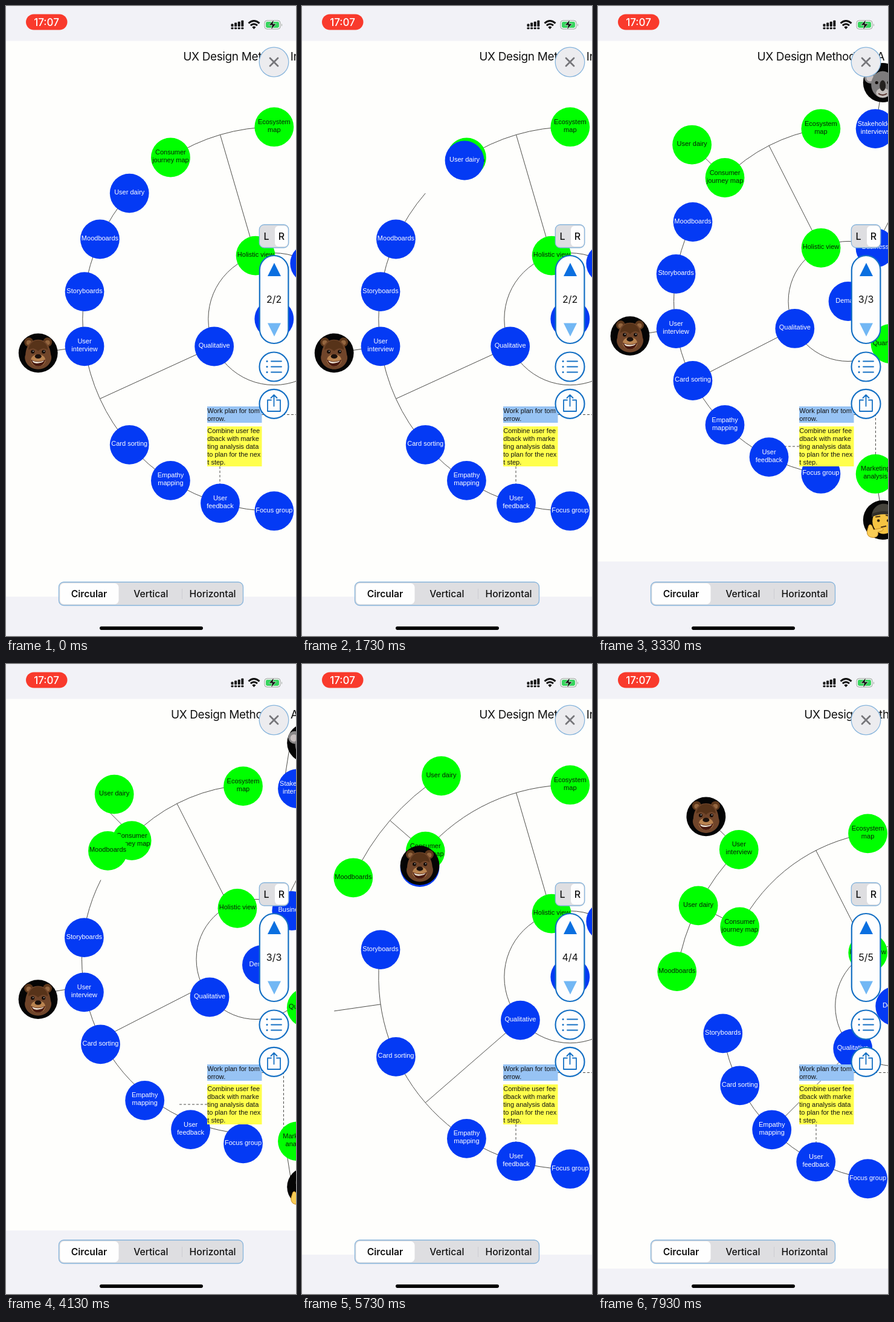
Recreate the animation shown at these times as an HTML page. Size 480 px wide and 1040 px high, loop 7.99 s.

```html
<!DOCTYPE html>
<html lang="en">
<head>
<meta charset="utf-8">
<title>Circular mind map</title>
<style>
  html, body { margin: 0; width: 100%; height: 100%; overflow: hidden; background: #fefefc; }
  svg { display: block; width: 100%; height: 100%; }
  text { font-family: Inter, Roboto, sans-serif; }
  .mid { text-anchor: middle; }
  .small text, .node text { font: 11px "Liberation Sans", Arial, sans-serif; }
  .node text { text-anchor: middle; }
  .line { fill: none; stroke: #4c4c48; stroke-width: 1; }
  .dash { stroke-dasharray: 4 3; }
  .ring { fill: #fefefe; stroke: #1570c4; stroke-width: 2.2; }
  .icon { fill: none; stroke: #1570c4; stroke-width: 1.8; stroke-linecap: round; stroke-linejoin: round; }
  .tray { fill: #dedee1; stroke: #86b4dc; stroke-width: 1.3; }
  .bar { fill: #f2f2f7; }
</style>
</head>
<body>
<svg viewBox="0 0 480 1040" preserveAspectRatio="none">
  <rect width="480" height="1040" fill="#fefefc"/>
  <text id="title" y="90" font-size="19" letter-spacing="-.37" fill="#111">UX Design Methods In A Nutshell</text>
  <path id="lines" class="line"/>
  <path id="dashes" class="line dash"/>
  <g id="nodes"></g>
  <g id="notes" class="small"></g>

  <rect class="bar" width="480" height="57.5"/>
  <rect id="footer" class="bar" width="480" height="140"/>

  <rect x="33" y="13.5" width="68.5" height="26" rx="13" fill="#f93a2c"/>
  <text class="mid" x="67" y="32.6" font-size="17" font-weight="500" fill="#fff">17:07</text>
  <g id="signal" fill="#111"></g>
  <g fill="none" stroke="#111" stroke-width="3">
    <path d="M401.5 28.5Q410.3 20.5 419.5 28.5"/>
    <path d="M404.8 32.2Q410.4 27.3 416 32.2"/>
  </g>
  <path d="M407.3 35Q410.4 32.2 413.5 35L410.4 38.3Z" fill="#111"/>
  <rect x="428" y="24" width="26" height="14" rx="4" fill="#f8f8fa" stroke="#94a094"/>
  <rect x="430" y="26" width="22" height="10" rx="2.4" fill="#36d45d"/>
  <path d="M456 29v4.5q2-2.2 0-4.5" fill="#94a094"/>
  <path d="M443.5 22.5l-8.5 9.2h5.4l-1.8 7.5 8.6-9.8h-5.4z" fill="#111" stroke="#fff" stroke-width=".6"/>

  <circle cx="443.5" cy="92.5" r="24.3" fill="#ececef" stroke="#86b4dc" stroke-width="1.3"/>
  <path d="M437 86l13 13m0-13l-13 13" stroke="#76767a" stroke-width="2.8" stroke-linecap="round"/>

  <rect class="tray" x="419.3" y="361" width="48.5" height="38" rx="8"/>
  <rect x="445" y="363" width="21.5" height="34" rx="6" fill="#fefefe"/>
  <g class="mid" font-size="16" font-weight="500" fill="#111">
    <text x="431" y="386">L</text><text x="456" y="386">R</text>
  </g>

  <rect class="ring" x="419.8" y="412" width="47.6" height="145" rx="23.8"/>
  <path d="M444 424l11 22h-22z" fill="#0b6fe0"/>
  <path d="M444 545.5l11-22h-22z" fill="#72b7f4"/>
  <text id="count" class="mid" x="443.6" y="490.4" font-size="16" fill="#111"></text>

  <circle class="ring" cx="443.5" cy="595.5" r="24"/>
  <path class="icon" d="M439 586.5h17m-17 9h17m-17 9h17"/>
  <path class="icon" stroke-width="3" style="stroke-width:3" d="M432 586.5h.1m-.1 9h.1m-.1 9h.1"/>
  <circle class="ring" cx="443.5" cy="656.8" r="24"/>
  <path class="icon" d="M439 650.5h-6v18.5h21v-18.5h-6m-4.5 10v-18.5m-5 5l5-5 5 5"/>

  <rect class="tray" x="87.5" y="951" width="305" height="38.5" rx="8"/>
  <rect x="89.5" y="953" width="97" height="34.5" rx="6.5" fill="#fefefe"/>
  <path d="M291.5 962v17" stroke="#cdcdd2"/>
  <g class="mid" font-size="15.7" font-weight="500" fill="#111">
    <text x="137.5" y="976" font-weight="600">Circular</text>
    <text x="239.8" y="976">Vertical</text>
    <text x="342" y="976">Horizontal</text>
  </g>
  <rect x="155" y="1024.3" width="171" height="5.6" rx="2.8" fill="#050505"/>
</svg>
<script>
const LOOP = 7990;
const $ = id => document.getElementById(id);

// Slots count clockwise from the left; rings grow outward.
const wide = { x: 443.8, y: 516.7, slots: 22, radii: [0, 109, 317, 394.6, 473] };
const tight = { slots: 20, radii: [0, 99, 288.5, 365.5, 442.5] };
const dashWide = 'M354 760V820M423 674.5H480';

// arcs: [ring, from slot, to slot]; links: [slot, inner ring, outer ring]
const layouts = [
  { ...wide, footer: 975, count: '2/2', dashes: dashWide,
    arcs: [[2, 3.5, 5.5], [2, -5.5, 2.5]],
    links: [[4.5, 1, 2], [-1.5, 1, 2], [-.5, 2, 3]] },
  { ...tight, x: 414, y: 487.5, footer: 917, count: '3/3',
    dashes: 'M333 727H284M423 674.5H459.5V772',
    arcs: [[2, 2.5, 4.5], [2, -4.5, 1.5]],
    links: [[3.5, 1, 2], [-1.5, 1, 2], [-.5, 2, 3], [2.5, 2, 3],
            [6.5, 1, 2], [5.5, 2, 3], [-5.5, 2, 3]] },
  { ...wide, footer: 975, count: '4/4', dashes: dashWide,
    arcs: [[2, 2.5, 5.5], [2, -5.5, .5], [3, 1.5, 3.5]],
    links: [[4.5, 1, 2], [-2.5, 1, 2], [-.5, 2, 3], [2.5, 2, 3]] },
  { ...tight, x: 491.7, y: 564.8, footer: 998, count: '5/5',
    dashes: 'M361 760V821M423 674.5H480',
    arcs: [[2, 1.5, 4.5], [2, -4.5, -.5], [3, .5, 2.5]],
    links: [[3.5, 1, 2], [-2.5, 1, 2], [1.5, 2, 3], [2.5, 3, 4]] }
];

const steps = [
  { who: ['User dairy'], to: { x: 269, y: 255 }, grab: 900, hold: 1650, drop: 2000, settle: 2400, redraw: 2650 },
  { who: ['Moodboards'], to: { x: 207, y: 288 }, grab: 3420, hold: 3900, drop: 4000, settle: 4350, redraw: 4500 },
  { who: ['User|interview', 'bear'], to: { x: 195, y: 335.5 }, grab: 4950, hold: 5650, drop: 6000, settle: 6400, redraw: 7000 }
];

const faces = {
  bear: `<g fill="#5d371b"><circle cx="-15.5" cy="-18" r="7.5"/><circle cx="15.5" cy="-18" r="7.5"/></g>
    <g fill="#94663f"><circle cx="-15.5" cy="-17" r="4"/><circle cx="15.5" cy="-17" r="4"/></g>
    <path d="M0-22C14-22 20-10 21 3C25 12 16 27 0 27S-25 12-21 3C-20-10-14-22 0-22Z" fill="#70452a"/>
    <path d="M0-21C10-21 16-12 16-5Q8-11 0-3Q-8-11-16-5C-16-12-10-21 0-21Z" fill="#573319"/>
    <ellipse cy="12" rx="12" ry="10" fill="#b98350"/>
    <circle cx="-9" cy="-2" r="3" fill="#160d08"/><circle cx="9" cy="-2" r="3" fill="#160d08"/>
    <circle cx="-8.2" cy="-2.8" r=".8" fill="#fff"/><circle cx="9.8" cy="-2.8" r=".8" fill="#fff"/>
    <ellipse cy="5.5" rx="5.5" ry="3.7" fill="#1c110c"/>
    <path d="M-12 11Q0 17 12 11Q9 22 0 22T-12 11Z" fill="#47180f"/>
    <path d="M-10 12.5Q0 17 10 12.5Q8 16 0 17T-10 12.5Z" fill="#f1e6d6"/>`,
  koala: `<g fill="#8a8889"><circle cx="-20" cy="-9" r="10.5"/><circle cx="20" cy="-9" r="10.5"/></g>
    <g fill="#c9c1c1"><circle cx="-21" cy="-8" r="6"/><circle cx="21" cy="-8" r="6"/></g>
    <ellipse cy="3" rx="19" ry="22" fill="#7d7b7c"/>
    <ellipse cy="17" rx="11" ry="8" fill="#c4bfbc"/>
    <ellipse cy="5" rx="5" ry="9" fill="#24211f"/>
    <circle cx="-10" cy="0" r="2.6" fill="#15110f"/><circle cx="10" cy="0" r="2.6" fill="#15110f"/>
    <path d="M-7 18Q0 23 7 18" fill="none" stroke="#54302b" stroke-width="2"/>`,
  thinker: `<ellipse cx="2" cy="2" rx="19" ry="21" fill="#f5c342"/>
    <path d="M-18-5C-18-34 22-34 22-5Q2-14-18-5Z" fill="#46443c"/>
    <path d="M-18-5Q2-15 22-5V-10Q2-19-18-10Z" fill="#302e29"/>
    <circle cx="-7" cy="1" r="2.3" fill="#30220f"/><circle cx="9" cy="1" r="2.3" fill="#30220f"/>
    <path d="M-12-5l8-1m9-2l8 2M-3 12l9-2" fill="none" stroke="#4b3214" stroke-width="2"/>
    <path d="M-23 9q2-3 5 0l3 7 14-3q4 2 0 5l-7 2q2 8-7 9-11 0-11-10z" fill="#f8cc55" stroke="#c98d25"/>`
};

// A single ring value holds for every layout; greenFrom is the layout that turns it green.
const node = (name, slots, rings = 2, greenFrom = 9) =>
  ({ name, slots, rings: [].concat(rings), greenFrom });
const nodes = [
  node('Demand', [0, 0, 0, 0], 0),
  node('Business', [7.5, 6.5, 7.5, 6.5], 1),
  node('Holistic view', [4.5, 3.5, 4.5, 3.5], 1, 0),
  node('Qualitative', [-1.5, -1.5, -2.5, -2.5], 1),
  node('Quantitative', [-8.5, -7.5, -8.5, -7.5], 1, 0),
  node('Ecosystem|map', [5.5, 4.5, 5.5, 4.5], 2, 0),
  node('Consumer|journey map', [3.5, 2.5, 2.5, 1.5], 2, 0),
  node('Stakeholder|interviews', [6.5, 5.5, 6.5, 5.5]),
  node('Marketing|analysis', [-6.5, -5.5, -6.5, -5.5], 2, 0),
  node('koala', [6.5, 5.5, 6.5, 5.5], 3),
  node('thinker', [-6.5, -5.5, -6.5, -5.5], 3),
  node('Storyboards', [.5, .5, .5, -.5]),
  node('Card sorting', [-2.5, -1.5, -1.5, -1.5]),
  node('Empathy|mapping', [-3.5, -2.5, -3.5, -2.5]),
  node('User|feedback', [-4.5, -3.5, -4.5, -3.5]),
  node('Focus group', [-5.5, -4.5, -5.5, -4.5]),
  node('User dairy', [2.5, 2.5, 3.5, 1.5], [2, 3, 3, 3], 1),
  node('Moodboards', [1.5, 1.5, 1.5, .5], [2, 2, 3, 3], 2),
  node('User|interview', [-.5, -.5, -.5, 2.5], [2, 2, 2, 3], 3),
  node('bear', [-.5, -.5, -.5, 2.5], [3, 3, 3, 4])
];

const span = (t, a, b) => Math.min(1, Math.max(0, (t - a) / (b - a)));
const ease = u => u * u * (3 - 2 * u);
const mix = (a, b, u) => a + (b - a) * u;
const mixPoint = (p, q, u) => ({ x: mix(p.x, q.x, u), y: mix(p.y, q.y, u) });

function polar(layout, ring, slot) {
  const a = slot * 2 * Math.PI / layout.slots, r = layout.radii[ring];
  return { x: layout.x - r * Math.cos(a), y: layout.y - r * Math.sin(a) };
}
const xy = p => p.x.toFixed(2) + ' ' + p.y.toFixed(2);

function linePath(l) {
  const r = l.radii[1];
  let d = `M${l.x - r} ${l.y}a${r} ${r} 0 1 1 ${2 * r} 0a${r} ${r} 0 1 1 ${-2 * r} 0`;
  for (const [ring, from, to] of l.arcs) {
    const R = l.radii[ring];
    d += `M${xy(polar(l, ring, from))}A${R} ${R} 0 0 1 ${xy(polar(l, ring, to))}`;
  }
  for (const [slot, a, b] of l.links) d += `M${xy(polar(l, a, slot))}L${xy(polar(l, b, slot))}`;
  return d;
}
layouts.forEach(l => { l.path = linePath(l); });

function build() {
  $('nodes').innerHTML = nodes.map(n => {
    const rows = n.name.split('|');
    const top = rows.length > 1 ? -5 : 2;
    const body = faces[n.name] || rows.map((s, i) => `<text y="${top + 13 * i}">${s}</text>`).join('');
    return `<g class="node"><circle r="32.4" fill="#050505"/>${body}</g>`;
  }).join('');
  nodes.forEach((n, i) => { n.el = $('nodes').children[i]; });

  const note = (y, h, fill, rows) => `<rect x="333" y="${y}" width="90.5" height="${h}" fill="${fill}"/>` +
    rows.map((s, i) => `<text x="333.3" y="${y + 11 + 13.1 * i}" fill="#111">${s}</text>`).join('');
  $('notes').innerHTML =
    note(661, 27, '#97c3f4', ['Work plan for tom', 'orrow.']) +
    note(694, 66, '#ffff4c', ['Combine user fee', 'dback with marke', 'ting analysis data', 'to plan for the nex', 't step.']);

  $('signal').innerHTML = [0, 1, 2, 3].map(i => {
    const x = 372.5 + 5.6 * i, h = 4.5 + 1.9 * i;
    return `<rect x="${x}" y="${34 - h}" width="4" height="${h}" rx="1"/>` +
      `<rect x="${x}" y="35.3" width="4" height="3" rx="1"/>`;
  }).join('');
}

function place(n, t) {
  const at = k => polar(layouts[k], n.rings[k] ?? n.rings[0], n.slots[k]);
  let p = at(0);
  steps.forEach((s, k) => {
    if (s.who.includes(n.name)) {
      const lift = n.name === 'bear' ? 3 : 0;
      p = mixPoint(p, { x: s.to.x, y: s.to.y - lift }, ease(span(t, s.grab, s.hold)));
    }
    p = mixPoint(p, at(k + 1), ease(span(t, s.drop, s.settle)));
  });
  return p;
}

function render(t) {
  const dropped = steps.filter(s => t >= s.drop).length;
  const drawn = layouts[steps.filter(s => t >= s.redraw).length];
  const glide = key => steps.reduce((v, s, k) =>
    mix(v, layouts[k + 1][key], ease(span(t, s.drop, s.settle))), layouts[0][key]);

  for (const n of nodes) {
    const p = place(n, t);
    n.el.setAttribute('transform', `translate(${xy(p)})`);
    if (faces[n.name]) continue;
    const green = dropped >= n.greenFrom;
    n.el.firstChild.setAttribute('fill', green ? '#00ff00' : '#043af4');
    n.el.setAttribute('fill', green ? '#062006' : '#fff');
  }
  $('lines').setAttribute('d', drawn.path);
  $('dashes').setAttribute('d', drawn.dashes);
  $('count').textContent = drawn.count;
  $('title').setAttribute('x', glide('x') - 150.5);
  $('footer').setAttribute('y', glide('footer'));
}

build();
const start = performance.now();
function tick() {
  render((performance.now() - start) % LOOP);
  requestAnimationFrame(tick);
}
tick();
</script>
</body>
</html>
```
